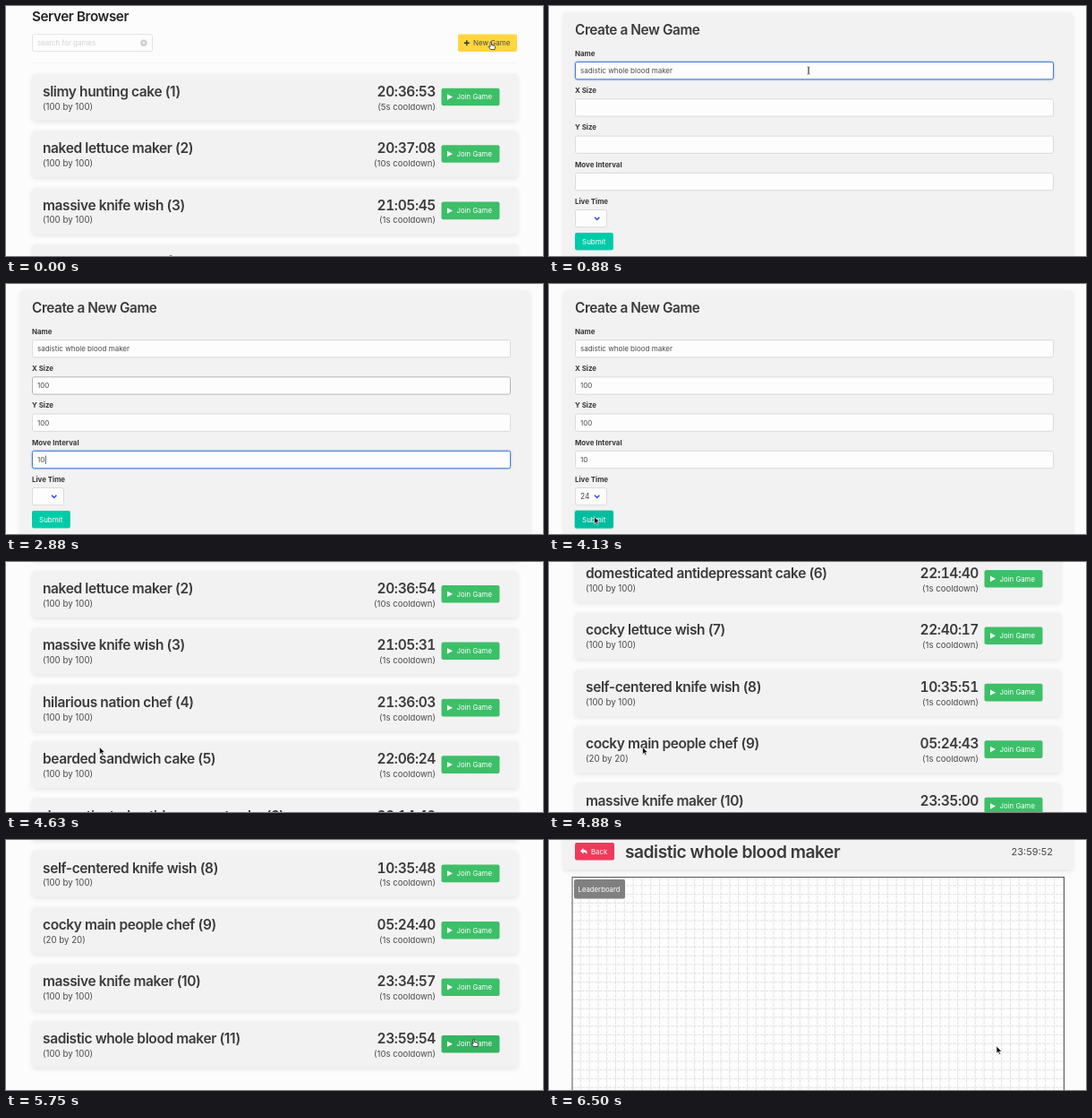
An HTML page for the animation above (6760 ms loop, 600 px wide and 279 px high).

```html
<!DOCTYPE html>
<html lang="en">
<head>
<meta charset="utf-8">
<title>Server Browser</title>
<style>
html, body { margin: 0; width: 100%; height: 100%; overflow: hidden; background: #fcfcfc; }
svg { display: block; width: 600px; height: 279px; font-family: Inter, Roboto, "Liberation Sans", sans-serif; }
text { fill: #4a4a4a; font-size: 8px; white-space: pre; }
.panel { fill: #f2f2f2; filter: drop-shadow(0 2px 2.5px rgba(0,0,0,.09)); }
.title { font-weight: 600; fill: #3a3a3a; letter-spacing: -.025em; }
.head { fill: #222; }
.clock { font-variant-numeric: tabular-nums; }
.label { font-weight: 700; fill: #363636; font-size: 7.9px; }
.field { fill: #fdfdfd; stroke: #dbdbdb; }
.hover { stroke: #b5b5b5; }
.focus { stroke: #4a7bd4; filter: drop-shadow(0 0 1px rgba(50,115,220,.6)); }
.faint { stroke: #e2e2e2; }
.hint { fill: #d2d2d2; }
.white { fill: #fff; font-size: 7.8px; }
.end { text-anchor: end; }
</style>
</head>
<body>
<svg id="stage" viewBox="0 0 600 279"></svg>
<script>
const LOOP = 6760, LAST = 52, PITCH = 63.45;

// name, time left at the start, cooldown, board side
const games = [
  ["slimy hunting cake", "20:36:53", 5, 100],
  ["naked lettuce maker", "20:37:08", 10, 100],
  ["massive knife wish", "21:05:45", 1, 100],
  ["hilarious nation chef", "21:36:17", 1, 100],
  ["bearded sandwich cake", "22:06:38", 1, 100],
  ["domesticated antidepressant cake", "22:14:54", 1, 100],
  ["cocky lettuce wish", "22:40:31", 1, 100],
  ["self-centered knife wish", "10:36:05", 1, 100],
  ["cocky main people chef", "05:24:57", 1, 20],
  ["massive knife maker", "23:35:14", 1, 100],
  ["sadistic whole blood maker", "24:00:11", 10, 100]
];
const newName = games[10][0];

const scrollPath = [[4380, 0], [4500, 45], [4630, 129.2], [4750, 270], [4880, 400], [5000, 494], [5130, 508.3]];
const mousePath = [
  [0, 541, 40], [130, 541, 40], [750, 330, 66], [880, 290, 72], [1250, 250, 73], [1500, 180, 113],
  [3000, 180, 113], [3250, 70, 215], [3380, 48, 237], [3630, 48, 237], [3880, 50.5, 259.5],
  [4130, 50.5, 259.5], [4500, 104.5, 206.5], [5250, 104.5, 206.5], [5750, 522, 222], [5880, 529, 226],
  [6250, 529, 226], [6380, 506, 230], [6500, 500, 230]
];

function along(path, t) {
  const i = path.findIndex(p => p[0] > t);
  if (i < 0) return path[path.length - 1].slice(1);
  if (i === 0) return path[0].slice(1);
  const a = path[i - 1], b = path[i], u = (t - a[0]) / (b[0] - a[0]);
  return a.slice(1).map((v, j) => v + (b[j + 1] - v) * u);
}

// value of the latest step reached
const latest = (steps, t) => steps.reduce((v, [at, next]) => t >= at ? next : v, "");

const rect = (x, y, w, h, attrs) => `<rect x="${x}" y="${y}" width="${w}" height="${h}" ${attrs}/>`;
const path = (d, attrs) => `<path d="${d}" ${attrs}/>`;
const text = (x, y, s, cls = "", size = 0) =>
  `<text x="${x}" y="${y}" class="${cls}" ${size ? `style="font-size:${size}px"` : ""}>${s}</text>`;

function clock(start, t) {
  const [h, m, s] = start.split(":").map(Number);
  const left = h * 3600 + m * 60 + s - Math.floor(t / 333 + .3);
  return [left / 3600, left / 60 % 60, left % 60].map(v => String(Math.floor(v)).padStart(2, "0")).join(":");
}

function card([name, start, cooldown, side], i, t, hot) {
  const y = 75.5 + i * PITCH;
  return rect(29, y, 543, 52, 'rx="4" class="panel"') +
    text(41, y + 25.2, `${name} (${i + 1})`, "title", 15.5) +
    text(41, y + 40, `(${side} by ${side})`, "", 9.7) +
    text(480, y + 25.2, clock(start, t), "title clock end", 15.5) +
    text(480, y + 40, `(${cooldown}s cooldown)`, "end", 9.6) +
    rect(486.5, y + 16.2, 65, 19.6, `rx="2" fill="${hot ? "#35b461" : "#3dbf68"}"`) +
    path(`M493 ${y + 22.8}v6.4l6-3.2z`, 'fill="#fff"') +
    text(503.6, y + 28.8, "Join Game", "white");
}

function list(t) {
  const [scroll] = along(scrollPath, t < 4000 ? 0 : t);
  const cards = games.map((g, i) => card(g, i, t, i === 10 && t >= 5750)).join("");
  return `<g transform="translate(0 ${-scroll})">` +
    text(29, 16.8, "Server Browser", "title head", 15.2) +
    rect(29.5, 31.7, 134, 19, 'rx="2" class="field faint"') +
    text(35, 44.2, "search for games", "hint", 7.9) +
    '<circle cx="154" cy="41.2" r="3.7" fill="#cfcfcf"/>' +
    path("M152.6 39.8l2.8 2.8m0-2.8l-2.8 2.8", 'stroke="#fff"') +
    rect(505, 31.5, 66, 19.5, 'rx="2" fill="#ffd63f"') +
    path("M511.8 41.2h6m-3-3v6", 'stroke="#333" stroke-width="1.4"') +
    text(522, 44.1, "New Game", "", 8) +
    rect(29, 63, 543, 1, 'fill="#f2f2f2"') +
    cards + "</g>";
}

function form(t) {
  const focus = latest([[880, "Name"], [1500, "X Size"], [2130, "Y Size"], [2250, "Move Interval"],
    [3380, "Live Time"], [4000, "Submit"]], t);
  const hover = latest([[750, "Name"], [1380, "X Size"], [3130, ""]], t);
  const values = {
    "Name": newName,
    "X Size": latest([[1630, "1"], [1750, "10"], [1880, "100"]], t),
    "Y Size": latest([[2130, "100"]], t),
    "Move Interval": latest([[2500, "1"], [2630, "10"]], t)
  };
  const state = name => name === focus ? " focus" : name === hover ? " hover" : "";
  let out = rect(16, 7, 569.5, 300, 'rx="4" class="panel"') + text(29, 32, "Create a New Game", "title", 15.3);

  Object.entries(values).forEach(([name, value], i) => {
    const y = 62.5 + i * 41.3;
    out += text(29, y - 6.7, name, "label") +
      rect(29.5, y, 534, 19.3, `rx="2" class="field${state(name)}"`) +
      text(35, y + 12.6, value);
  });
  if (t >= 2880 && t < 3000) out += rect(43.8, 191.5, .8, 9.5, 'fill="#333"');

  out += text(29, 220.9, "Live Time", "label") +
    rect(29.5, 227.5, 35, 19.3, `rx="2" class="field${state("Live Time")}"`) +
    text(35, 240.1, t >= 3500 ? "24" : "", "", 8.4) +
    path("M51 235.7l2.7 2.7 2.7-2.7", 'fill="none" stroke="#3558d8" stroke-width="1.6"');

  if (focus === "Submit") out += rect(28, 252, 44.5, 21.5, 'rx="3" fill="#9fe3d5"');
  out += rect(29, 253, 42.8, 19.6, `rx="2" fill="${t >= 3750 ? "#00bd9f" : "#00cba9"}"`) +
    text(37, 265.8, "Submit", "white", 8);

  if (t >= 1630 && t < 2130)
    out += rect(29, 123, 534.5, 11.2, 'fill="#1b1b1b"') + text(31.5, 130.9, "100", "white", 6.2);
  return out;
}

function board(t) {
  let grid = "";
  for (let x = 35.3; x < 575; x += 9.8) grid += `M${x.toFixed(1)} 42V279`;
  for (let y = 50.8; y < 279; y += 9.8) grid += `M26 ${y.toFixed(1)}H575`;
  return rect(16, -20, 569.5, 53, 'rx="4" class="panel"') +
    rect(29, 3, 44, 19.4, 'rx="2" fill="#f03a5c"') +
    path("M35 12.2l3.4-3.2v2c3 0 4.6 1.3 4 5-.7-1.8-1.8-2.3-4-2.3v1.9z", 'fill="#fff"') +
    text(47, 15.6, "Back", "white") +
    text(85, 19.6, newName, "title", 19.2) +
    text(563, 17, clock(games[10][1], t), "end", 11) +
    rect(26, 41.5, 549.5, 260, 'fill="#fdfdfd"') +
    path(grid, 'stroke="#dcdcdc" stroke-width=".8" stroke-dasharray="4 1"') +
    rect(26, 41.5, 549.5, 260, 'fill="none" stroke="#555"') +
    rect(28, 44, 57, 21.5, 'rx="2" fill="#808080"') +
    text(32.5, 57.5, "Leaderboard", "white", 7.75);
}

const cursors = {
  arrow: path("M0 0v8.2l1.9-1.7 1.3 2.9 1.3-.6-1.2-2.8h2.5z", 'fill="#111" stroke="#fff" stroke-width=".6"'),
  hand: path("M0 .6q.9-1 1.6 0v2.9l3.2.8q1 .3.8 1.4l-.6 2.9h-4.4l-2.5-3.2q0-1.1 1.9.1z",
    'fill="#fff" stroke="#222" stroke-width=".8"'),
  beam: path("M-1.5-4.2q1.5 0 1.5 1v6.4q0 1-1.5 1M1.5-4.2q-1.5 0-1.5 1v6.4q0 1 1.5 1",
    'fill="none" stroke="#333" stroke-width=".7"')
};

function mouse(t) {
  const kind = latest([[0, "hand"], [130, "arrow"], [750, "beam"], [1630, ""], [3000, "arrow"],
    [5750, "hand"], [6250, "arrow"]], t);
  const [x, y] = along(mousePath, t);
  return kind ? `<g transform="translate(${x} ${y})">${cursors[kind]}</g>` : "";
}

const pages = { list, form, board, blank: () => "" };
const pageAt = t => latest([[0, "list"], [130, "form"], [4250, "blank"], [4380, "list"], [6250, "board"]], t);

const stage = document.getElementById("stage");
const began = performance.now();
let shown = -1;

// eight pictures a second, with a longer hold at the end
function tick(now) {
  const ms = Math.max(0, now - began) % LOOP;
  const step = Math.min(LAST, Math.floor(Math.floor(ms / 10) / 12.5));
  if (step !== shown) {
    shown = step;
    const t = Math.round(step * 12.5) * 10;
    stage.innerHTML = pages[pageAt(t)](t) + mouse(t);
  }
  requestAnimationFrame(tick);
}
tick(began);
</script>
</body>
</html>
```
